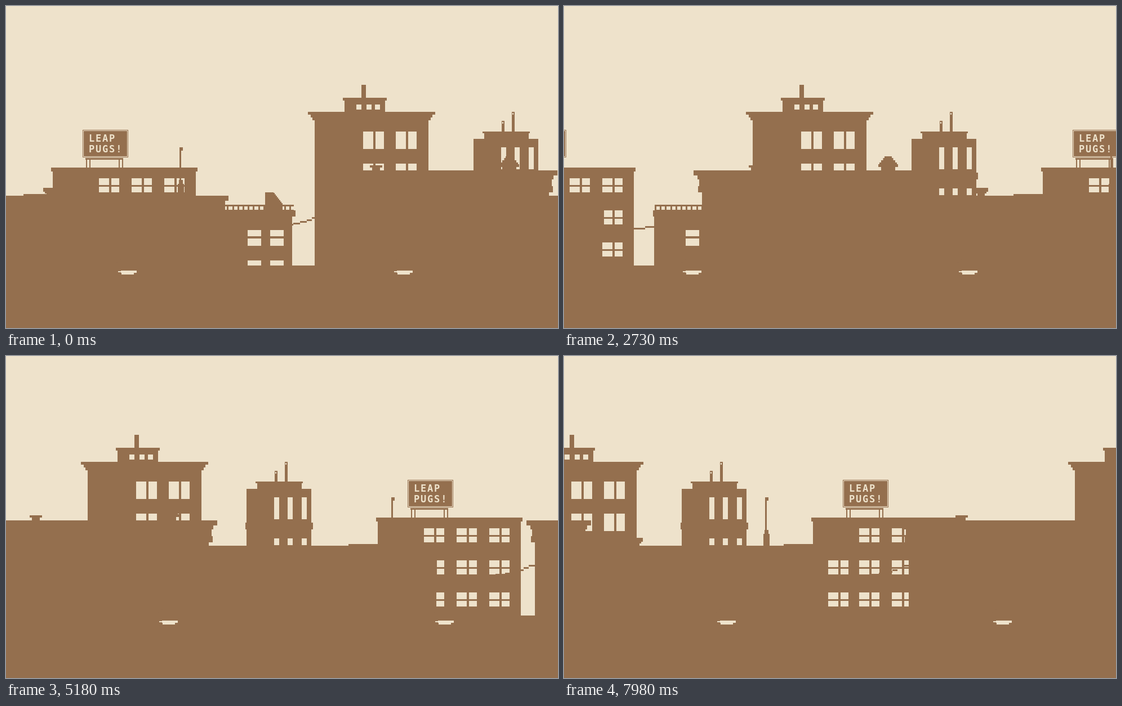
Write an HTML page with a canvas that moves like this. It is 980x572 px and loops after 8000 ms.

```html
<!DOCTYPE html>
<html lang="en">
<head>
<meta charset="utf-8">
<title>City skyline</title>
<style>
  html, body { margin: 0; height: 100%; overflow: hidden; background: #eee2cb; }
  canvas { display: block; }
</style>
</head>
<body>
<canvas id="stage" width="980" height="572"></canvas>
<script>
const ctx = document.getElementById('stage').getContext('2d');
const SKY = '#eee2cb', BROWN = '#946f4e';
const WIDTH = 980, HEIGHT = 572, LOOP = 8000, STEP = 70;

function box(left, top, right, bottom, color = BROWN) {
  ctx.fillStyle = color;
  ctx.fillRect(left, top, right - left, bottom - top);
}
const hole = (left, top, right, bottom) => box(left, top, right, bottom, SKY);

// Box that is symmetric about a centre line
const centred = (middle, half, top, bottom) => box(middle - half, top, middle + half, bottom);

function sign() {
  ctx.strokeStyle = BROWN;
  ctx.lineWidth = 1;
  ctx.strokeRect(136.5, 220.5, 80, 48);
  box(138, 222, 215, 267);
  box(141, 270, 208, 273);
  for (const x of [142, 148, 200, 206]) box(x, 273, x + 2, 287);
  ctx.fillStyle = SKY;
  ctx.font = 'bold 17px "DejaVu Sans Mono", monospace';
  ctx.letterSpacing = '1.8px';
  ctx.fillText('LEAP', 147, 241);
  ctx.fillText('PUGS!', 147, 260);
}

function office() {
  box(31, 334, 83, HEIGHT);
  box(83, 287, 337, HEIGHT);
  box(80, 287, 340, 294);
  for (const y of [306, 363, 420])
    for (const x of [110, 165, 223, 281]) {
      if (x === 110 && y === 306) continue;
      for (const [left, right] of [[x, x + 18], [x + 22, x + 36]]) {
        hole(left, y, right, y + 12);
        hole(left, y + 15, right, y + 25);
      }
    }
}

function terrace() {
  box(373, 363, 508, HEIGHT);
  box(371, 363, 514, 374);
  box(374, 353, 511, 356);
  box(374, 362, 511, 363);
  for (let i = 0; i < 15; i++) {
    const x = Math.round(374 + i * 9.2);
    box(x, 356, x + 3, 363);
  }
  box(460, 331, 475, 363);
  for (let i = 0; i < 8; i++) box(475 + i * 2, 332 + i * 2.6, 477 + i * 2, 363);
  for (const x of [429, 469]) {
    hole(x, 398, x + 24, 409);
    hole(x, 413, x + 24, 426);
    hole(x, 452, x + 24, 463);
  }
}

function tower() {
  box(548, 188, 750, HEIGHT);
  centred(649, 113, 188, 193);
  centred(649, 108, 193, 198);
  centred(649, 105, 198, 203);
  box(601, 163, 673, 188);
  box(598, 163, 676, 168);
  box(631, 140, 639, 163);
  for (const x of [622, 640, 655]) hole(x, 175, x + 9, 184);
  for (const y of [223, 280])
    for (const x of [634, 692]) {
      hole(x, y, x + 18, y + 31);
      hole(x + 22, y, x + 37, y + 31);
    }
}

function hall() {
  box(830, 236, 945, HEIGHT);
  box(849, 223, 928, 236);
  box(846, 223, 930, 226);
  box(828, 296, 948, 308);
  for (const [x, top] of [[880, 204], [898, 188]]) {
    box(x, top, x + 5, 223);
    hole(x + 1, top + 2, x + 3, top + 5);
  }
  for (const x of [879, 903, 928]) {
    hole(x, 251, x + 9, 290);
    hole(x, 324, x + 9, 336);
  }
}

function farBuildings() {
  sign();
  office();
  terrace();
  tower();
  hall();
}

function cable() {
  const steps = [[387, 390], [406, 394], [462, 391], [493, 387], [510, 385],
                 [522, 382], [534, 379], [543, 375], [552, 371], [564, 0]];
  for (let i = 0; i < steps.length - 1; i++)
    box(steps[i][0], steps[i][1], steps[i + 1][0], steps[i][1] + 3);
}

function nearBuildings() {
  // Low roof with urn and lamp
  box(-20, 337, 384, HEIGHT);
  box(365, 337, 395, 346);
  box(384, 346, 389, 393);
  box(66, 323, 91, 330);
  box(69, 330, 88, 333);
  box(72, 333, 85, 337);
  box(305, 316, 316, 337);
  box(307, 309, 314, 316);
  box(308, 251, 311, 316);
  box(308, 251, 314, 257);
  cable();
  // High roof with stepped cornice, vent and dome
  const middle = 763.5;
  centred(middle, 215.5, 292, 301);
  centred(middle, 208.5, 301, 308);
  centred(middle, 205.5, 308, 320);
  centred(middle, 207.5, 320, 331);
  centred(middle, 200.5, 331, HEIGHT);
  box(646, 283, 668, 287);
  box(650, 287, 664, 293);
  const dome = [[267, 6.5], [270, 9], [274, 12.5], [278, 15.5], [281, 17.5], [286, 12.5]];
  for (const [top, half] of dome) centred(893.5, half, top, top < 281 ? 281 : top < 286 ? 286 : 293);
}

function car() {
  box(6, 448, 33, 465);
  box(33, 451, 46, 465);
  for (let i = 0; i < 4; i++) box(-6 + i * 3, 458 - i * 2.5, 6, 465);
  hole(0, 471, 6, 473);
  hole(5, 470, 33, 474);
  hole(6, 473, 28, 477);
}

function scroll(drawLayer, offset, period) {
  const start = Math.floor(offset) % period - period;
  for (let x = start; x < WIDTH + period; x += period) {
    ctx.save();
    ctx.translate(x, 0);
    drawLayer();
    ctx.restore();
  }
}

function render() {
  const step = Math.floor(performance.now() % LOOP / STEP);
  hole(0, 0, WIDTH, HEIGHT);
  scroll(farBuildings, -step * WIDTH / 180, WIDTH);
  scroll(nearBuildings, 0.5 - step * WIDTH / 120, WIDTH);
  box(0, 461, WIDTH, HEIGHT);
  scroll(car, 199 - step * WIDTH / 80, WIDTH / 2);
  requestAnimationFrame(render);
}
render();
</script>
</body>
</html>
```
